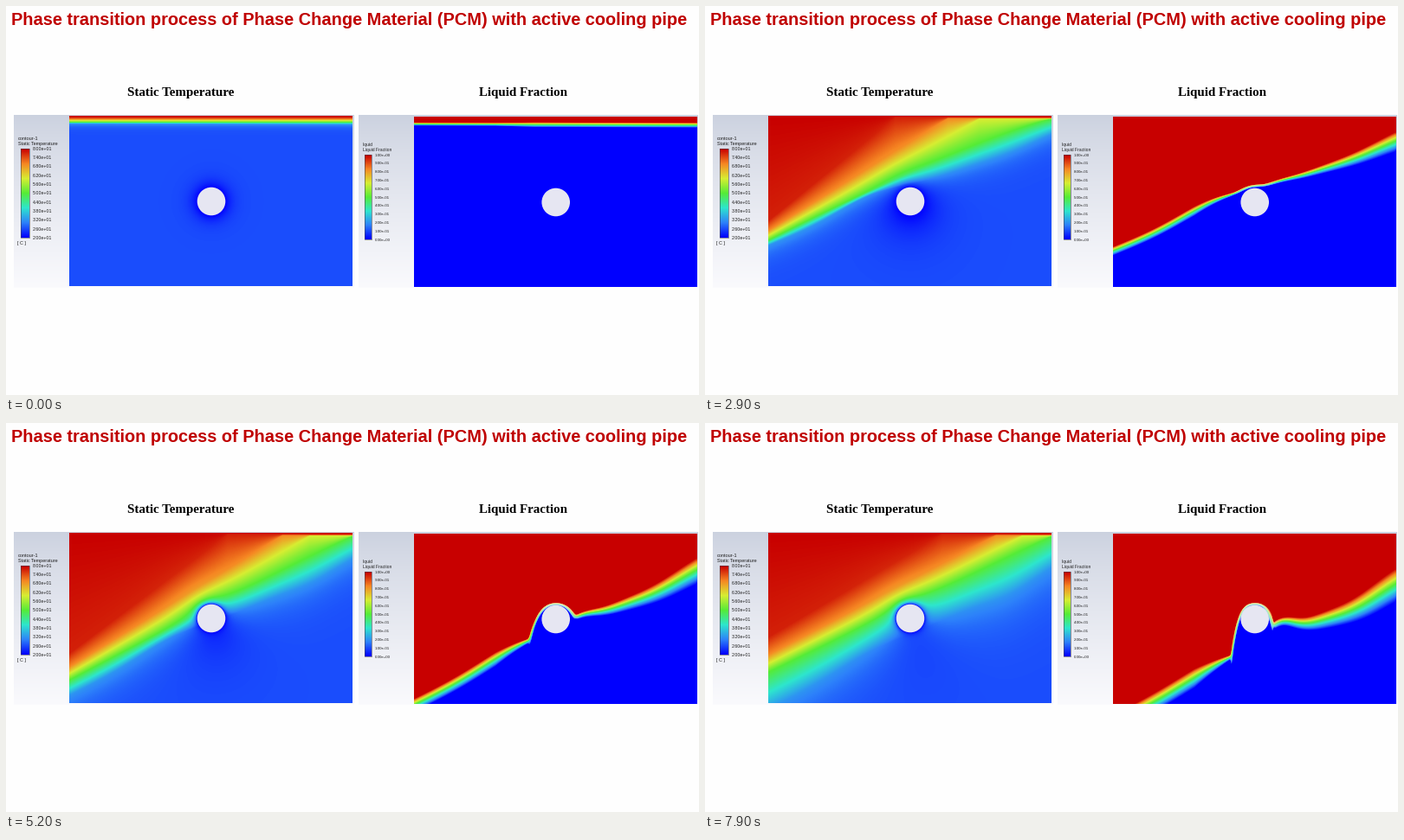
Write a matplotlib script that moves like this. It is 800 px wide and 450 px high and loops after 8000 ms.

```python
import numpy as np
import matplotlib.pyplot as plt
from matplotlib.animation import FuncAnimation
from matplotlib.colors import LinearSegmentedColormap
from matplotlib.patches import Circle, Rectangle

FRAMES, INTERVAL = 80, 100
W, H = 327, 197                      # size of each simulated domain
TEMP_X, TEMP_Y = 73, 127
LIQ_X, LIQ_Y = 471, 128
PIPE_R = 16.3
AMBIENT = 0.1
INK = "#202020"

key_colors = [(0, 0, 255), (45, 130, 250), (45, 230, 205), (85, 236, 55),
              (215, 238, 50), (246, 135, 35), (200, 0, 0)]
rainbow = LinearSegmentedColormap.from_list(
    "rainbow", np.array(key_colors) / 255, N=512)

# Domain coordinates, the pipe being near the middle
col = np.arange(W) + 0.5
row = (np.arange(H) + 0.5)[:, None]
across = col / W
pipe_dx, pipe_dy = col - 164, row - 99
radius = np.hypot(pipe_dx, pipe_dy)
gap = np.maximum(radius - PIPE_R, 0)
below = np.maximum(pipe_dy, 0) / radius


def bump(center, width):
    return np.exp(-((pipe_dx - center) / width) ** 2)


def left_height(t):
    return 136 + 207 * (1 - np.exp(-t / 2.5)) + 1.4 * t


def melt_line(t):
    """Melting front without the pipe: a tilting, slightly bent line."""
    left, right = left_height(t), 137 + 5.4 * t
    bend = (1 - np.exp(-3 * t)) * (14 - 0.9 * t)
    return left + (right - left) * across - bend * bump(-45, 55) + t * bump(115, 40)


def melt_front(t):
    """The front bends over the cold pipe, more steeply as time goes on."""
    line = melt_line(t) - 0.28 * t ** 2 * bump(27, 25)
    shield = 209 + 0.022 * pipe_dx ** 2 + 2e-5 * max(t - 4, 0) * pipe_dx ** 4
    soft = 3
    return -soft * np.logaddexp(-line / soft, -shield / soft)


def isotherms(t):
    """(temperature, height) of the contour lines, hot to cold."""
    spread = 3 + 0.9 * t
    green = left_height(t) - 4 - 0.85 * t ** 2
    yellow = green - spread
    orange = yellow - spread
    red = orange - 2 * spread
    # each line falls from the left wall to the top wall at `reach`
    lines = [(0.96, red, 212 - 180 * np.exp(-0.35 * t), 1),
             (0.83, orange, 272 - 205 * np.exp(-0.4 * t), 1),
             (0.67, yellow, 302 - 175 * np.exp(-0.38 * t), 1),
             (0.50, green, W, 1 + 1.4 * np.exp(-0.7 * t))]
    levels = [(1, np.full(W, float(TEMP_Y)))]
    film = 0.6 * (1 + 2 * np.exp(-3 * t))
    for i, (temp, height, reach, power) in enumerate(lines):
        floor = TEMP_Y + 2 + film * i
        fall = np.clip(1 - col / reach, 0, 1) ** power
        levels.append((temp, floor + max(height - floor, 0) * fall))
    levels.append((0.2, melt_line(t) - 1.8 * t))
    return levels


def temperature(t):
    y = row + TEMP_Y
    levels = isotherms(t)
    temp = np.ones((H, W))
    for (hot, upper), (cold, lower) in zip(levels, levels[1:]):
        step = np.maximum(lower - upper, 0.8)
        temp -= (hot - cold) * np.clip((y - upper) / step, 0, 1)
    depth = np.maximum(y - levels[-1][1], 0)
    temp -= (0.2 - AMBIENT) * (1 - np.exp(-depth / (3 + 3 * t)))
    reach = (8 + 10 * min(t, 1)) * (1 + 0.1 * t * below)
    return ((temp - AMBIENT) * (1 - np.exp(-gap / 3))
            + AMBIENT * (1 - np.exp(-gap / reach)))


def liquid_image(t):
    front = melt_front(t)
    early = np.exp(-3 * t)
    left, mid, right = 4 + 1.9 * t, 3.5 + 2.5 * early, 14 - 8 * early + 2.3 * t
    to_left = np.clip((-25 - pipe_dx) / 45, 0, 1)
    to_right = np.clip((pipe_dx - 10) / 150, 0, 1) ** (0.5 + 2.5 / (t + 0.01))
    thick = mid + (left - mid) * to_left + (right - mid) * to_right
    dist = (row + LIQ_Y - front) / np.hypot(1, np.gradient(front))
    fraction = np.where(dist < 0, 0.6 - 0.4 * dist / (0.35 * thick),
                        0.6 * (1 - dist / (0.65 * thick)))
    fraction = np.clip(fraction, 0, 1)
    rgb = rainbow(fraction)[..., :3]
    # the squeezed film over the pipe looks almost white
    pale = np.clip((t - 2) / 1.5, 0, 1) * np.exp(-(pipe_dx / 24) ** 4)
    mix = (3 * pale * fraction * (1 - fraction))[..., None]
    return rgb * (1 - mix) + 0.92 * mix


fig = plt.figure(figsize=(8, 4.5), dpi=100, facecolor="#fefefe")
ax = fig.add_axes([0, 0, 1, 1])
ax.axis("off")


def picture(data, x, y, w, h):
    return ax.imshow(data, extent=(x, x + w, y + h, y), aspect="auto",
                     interpolation="nearest", cmap=rainbow, vmin=0, vmax=1)


def label(x, y, text, size, family="Liberation Sans", **kw):
    ax.text(x, y, text, fontsize=size * 0.72, family=family, **kw)


def panel(x, y, w, h):
    s = np.linspace(0, 1, h)[:, None, None] ** 0.8
    shade = np.array([203, 209, 223]) * (1 - s) + np.array([250, 250, 253]) * s
    picture(shade / 255, x, y, w, h)


def legend(x, y, w, h, text_x, size, values):
    picture(np.linspace(1, 0, h)[:, None], x, y, w, h)
    ax.add_patch(Rectangle((x, y), w, h, fill=False, ec="#404050", lw=0.4))
    for i, value in enumerate(values):
        label(text_x, y + h * i / 10 + size * 0.36, f"{value:.2e}", size, color=INK)


panel(9, 126, 393, 200)
panel(407, 126, 392, 200)
temp_img = picture(temperature(0), TEMP_X, TEMP_Y, W, H)
liquid_img = picture(liquid_image(0), LIQ_X, LIQ_Y, W, H)
for center in ((237, 226), (634.7, 227)):
    ax.add_patch(Circle(center, PIPE_R, fc="#e6e6f2", ec="none"))

label(6, 22, "Phase transition process of Phase Change Material (PCM) "
      "with active cooling pipe", 20.05, weight="bold", color="#c00000")
label(140, 104, "Static Temperature", 15, "Liberation Serif", weight="bold")
label(546, 104, "Liquid Fraction", 15, "Liberation Serif", weight="bold")

label(14, 155, "contour-1", 5.5, color=INK)
label(14, 161, "Static Temperature", 5.5, color=INK)
legend(17, 165, 10, 103, 31, 5.2, 80 - 6 * np.arange(11))
label(13, 276, "[ C ]", 5.5, color=INK)

label(412, 162, "liquid", 5, color=INK)
label(412, 168, "Liquid Fraction", 5, color=INK)
legend(414, 172, 8, 98, 426, 4.4, np.arange(10, -1, -1) / 10)

ax.set_xlim(0, 800)
ax.set_ylim(450, 0)


def update(frame):
    t = frame * INTERVAL / 1000
    temp_img.set_data(temperature(t))
    liquid_img.set_data(liquid_image(t))
    return temp_img, liquid_img


anim = FuncAnimation(fig, update, frames=FRAMES, interval=INTERVAL,
                     repeat=True, repeat_delay=0, blit=False)
plt.show()
```
